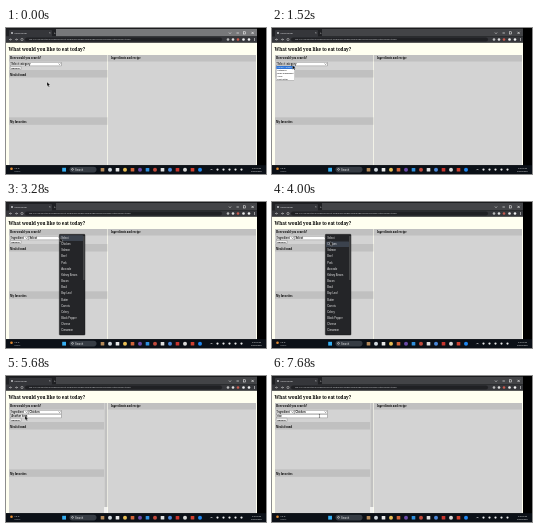
Animation of 260x146 px, one loop 8 s. Source, as an HTML page:

```html
<!DOCTYPE html>
<html lang="en">
<head>
<meta charset="utf-8">
<title>Meal finder</title>
<style>
html, body { margin: 0; width: 100%; height: 100%; overflow: hidden; background: #000; }
svg { display: block; width: 100%; height: 100%; }
text { white-space: pre; }
.serif { font-family: "Noto Serif", serif; }
.sans { font-family: "Liberation Sans", sans-serif; }
</style>
</head>
<body>
<svg id="stage" viewBox="0 0 260 146" preserveAspectRatio="none"></svg>
<script>
const LOOP = 8000, STEP = 80;
const PAGE = '#fffff0', BODY = '#d3d3d3', HEAD = '#c0c0c0';
const stage = document.getElementById('stage');

const rect = (x, y, w, h, fill, extra = '') =>
  `<rect x="${x}" y="${y}" width="${w}" height="${h}" fill="${fill}" ${extra}/>`;
const dot = (x, y, r, fill) => `<circle cx="${x}" cy="${y}" r="${r}" fill="${fill}"/>`;
const line = (d, color, width = 0.5) =>
  `<path d="${d}" fill="none" stroke="${color}" stroke-width="${width}"/>`;
const text = (x, y, size, fill, str, cls = 'sans', weight = 400) =>
  `<text class="${cls}" x="${x}" y="${y}" font-size="${size}" font-weight="${weight}" fill="${fill}">${str}</text>`;
const title = (x, y, str) => text(x, y, 2.6, '#000', str, 'serif', 900);

const field = (x, y, w, label) =>
  rect(x, y, w, 3.7, '#fff', 'stroke="#767676" stroke-width=".4"') +
  text(x + 1, y + 2.8, 2.6, '#000', label, 'sans', 700);

const select = (x, y, w, label) => field(x, y, w, label) +
  line(`M${x + w - 2.4} ${y + 1.4}l.8 .8l.8-.8`, '#000', 0.5);

const button = y =>
  rect(4.2, y, 11, 3.1, '#efefef', 'stroke="#767676" stroke-width=".4" rx=".4"') +
  text(5.2, y + 2.4, 2.5, '#000', 'Search', 'sans', 700);

// The title bar darkens once the window has focus.
function titleBar(t) {
  return rect(0, 0, 251, 8.5, t < 1520 ? '#77787a' : '#434447') + rect(0, 0, 251, 1, '#1b1c1e') +
    rect(0, 1, 50, 7.5, '#202124') + rect(3, 2, 43, 7, '#35363a', 'rx="1"') +
    dot(6, 5, 1, '#c4c6c8') + text(8.5, 5.9, 2.5, '#e2e3e5', 'Meal finder') +
    text(43, 5.9, 2.8, '#ddd', '×') + text(48, 6.2, 3, '#ccc', '+') +
    line('M223 4.6l1 1l1-1M230.5 5h2.4M245.5 3.8l2.2 2.2m0-2.2l-2.2 2.2', '#fff', 0.6) +
    rect(237.5, 3.8, 2.2, 2.2, 'none', 'stroke="#fff" stroke-width=".5"');
}

function toolbar() {
  let s = rect(0, 8.5, 251, 6, '#35363a') + rect(19, 9.4, 197, 4.2, '#202124', 'rx="2"');
  s += line('M6 11.5H3.5l1-1m-1 1l1 1M9 11.5h2.5l-1-1m1 1l-1 1', '#ddd') +
    '<circle cx="16" cy="11.5" r="1.1" fill="none" stroke="#ddd" stroke-width=".5"/>';
  s += text(23, 12.4, 2.5, '#c6c8cb', 'file:///C:/projects/coursework/front-end/meal-finder/app/pages/search/index.html?view=today');
  [[222, '#bbb'], [227, '#ddd'], [232, '#c85a4e'], [237.5, '#eee'], [243, '#f2f2f2']]
    .forEach(([x, c]) => s += dot(x, 11.5, 1.3, c));
  return s + line('M248.5 10v3', '#ddd', 0.6);
}

function taskbar() {
  const colors = ['#b58a5a', '#cfd6dd', '#e8e8e8', '#e8bd55', '#d0643a', '#6a4aa8', '#2f8fdc',
    '#c14a3c', '#e0e0e0', '#4a86d8', '#c8352e', '#d8d8d8', '#d0402f', '#1f86f0'];
  let s = rect(0, 137.2, 260, 8.8, '#0b1017');
  s += dot(5.5, 140.8, 1.3, '#e28b32') + text(8.3, 141, 2.4, '#f2f2f2', '72°F') +
    text(8.3, 143.8, 2.2, '#b4b8bd', 'Sunny');
  s += rect(56.2, 139.8, 3.8, 3.8, '#35aef2') + rect(63.5, 138.8, 27, 5.6, '#363c44', 'rx="2.8"') +
    '<circle cx="66.5" cy="141.4" r=".9" fill="none" stroke="#fff" stroke-width=".5"/>' +
    text(69, 142.5, 2.6, '#e6e8ea', 'Search');
  colors.forEach((c, i) => s += i % 2 ? dot(96.5 + i * 7.5, 141.7, 2, c)
    : rect(94.7 + i * 7.5, 139.9, 3.6, 3.6, c, 'rx=".5"'));
  s += line('M204.5 142.1l1-1l1 1', '#fff', 0.6);
  for (let i = 0; i < 5; i++) s += dot(211.5 + i * 6, 141.6, 1.1, '#e8e8e8');
  return s + text(246, 141, 2.4, '#f4f4f4', '2:34 PM') + text(245, 143.9, 2.4, '#f4f4f4', '4/18/2023');
}

// The left column gains a text field, which makes it overflow and scroll.
function page(t) {
  const grown = t >= 5520, dy = grown ? 4 : 0, w = grown ? 95.3 : 98.3;
  let s = rect(0, 14.5, 251, 122.8, PAGE) +
    text(2.5, 22.7, 4.48, '#000', 'What would you like to eat today?', 'serif', 700);
  s += rect(3, 27, w, 110, BODY) + rect(102, 27, 148, 110, BODY) +
    rect(102, 27, 148, 6.5, HEAD) + title(105, 31.4, 'Ingredients and recipe');
  [[27, 6.5, 'How would you search?'], [42 + dy, 7.5, 'Meals found'], [89.3 + dy, 7.5, 'My favorites']]
    .forEach(([y, h, label]) => s += rect(3, y, w, h, HEAD) + title(4, y + (h < 7 ? 4.4 : 5.8), label));
  if (grown) s += rect(98.3, 27, 3, 110, '#f1f1f1') + rect(98.3, 27, 3, 104, '#c1c1c1');

  if (t < 2160) s += select(4.2, 34.2, 51, 'Select category');
  else s += select(4.2, 34.2, 17.8, 'Ingredient') +
    select(22.4, 34.2, 32.8, t < 4480 ? 'Select' : 'Chicken');
  if (grown) {
    const typed = 'rice'.slice(0, Math.max(0, Math.floor((t - 7120) / 120)));
    s += field(4.2, 38.2, 51, typed || (t < 6880 ? 'Another item' : ''));
  }
  return s + button(grown ? 42.2 : 38.4);
}

function typeMenu(t, y) {
  if (t < 1520 || t >= 2160) return '';
  const items = ['Select category', 'Category', 'Main ingredient', 'Area', 'First letter'];
  const hot = Math.max(0, Math.min(4, Math.floor((y - 36.2) / 2.8)));
  let s = rect(4.2, 38, 18.6, 14.2, '#fff', 'stroke="#777" stroke-width=".3"');
  items.forEach((label, i) => {
    if (i === hot) s += rect(4.4, 38.1 + i * 2.8, 18.2, 2.8, '#1967d2');
    s += text(5.2, 40.3 + i * 2.8, 2.4, i === hot ? '#fff' : '#000', label);
  });
  return s;
}

function foodMenu(t, y) {
  if (t < 3280 || t >= 4480) return '';
  const items = ['Select', 'Chicken', 'Salmon', 'Beef', 'Pork', 'Avocado', 'Kidney Beans', 'Bacon',
    'Basil', 'Bay Leaf', 'Butter', 'Carrots', 'Celery', 'Black Pepper', 'Cheese', 'Cinnamon'];
  const hot = y < 38.8 ? 0 : 1;
  let s = rect(53.3, 32.3, 25.7, 100.7, '#242528', 'rx=".7" stroke="#111" stroke-width=".4"');
  items.forEach((label, i) => {
    if (i === hot) s += rect(54, 33.3 + i * 6.15, 23, 5.6, '#3b424d', 'rx=".5"');
    s += text(55.2, 37 + i * 6.15, 2.6, '#eee', label);
  });
  return s + rect(77.6, 34, 0.7, 44, '#777', 'rx=".3"');
}

const path = [
  [0, 41, 54], [80, 41, 54], [560, 21, 37.4], [1040, 21, 37.4], [1120, 21.3, 37.2],
  [1520, 20.5, 37.2], [2080, 18, 44.5], [2240, 18, 44.5], [2640, 43, 38.8], [3040, 54, 35.8],
  [3600, 54, 35.8], [4000, 58, 39.5], [4320, 57, 40.2], [4400, 57, 40.2], [4640, 56, 36.3],
  [5120, 56, 36.3], [5520, 19, 39.8], [5840, 19, 39.8], [6080, 19, 43], [6160, 19, 43],
  [6880, 47.5, 38.4], [8000, 47.5, 38.4]
];

function pointer(t) {
  const i = path.findIndex(p => p[0] > t), [t0, x0, y0] = path[i - 1], [t1, x1, y1] = path[i];
  const k = (t - t0) / (t1 - t0), e = k * k * (3 - 2 * k);
  return [x0 + (x1 - x0) * e, y0 + (y1 - y0) * e];
}

const arrow = (x, y) =>
  `<path transform="translate(${x} ${y})" d="M0 0V4.2L1 3.3L1.7 4.9L2.5 4.5L1.8 3H3.1Z" fill="#080808" stroke="#eee" stroke-width=".25"/>`;
const caret = (x, y) => line(`M${x - 0.6} ${y}h1.2m-.6 0v3m-.6 0h1.2`, '#222', 0.4);

stage.innerHTML = rect(0, 0, 260, 146, '#000') + '<g id="live"></g>' + toolbar() + taskbar() + '<g id="top"></g>';
const live = document.getElementById('live'), over = document.getElementById('top');

function draw(ms) {
  const t = Math.floor(ms % LOOP / STEP) * STEP;
  const [x, y] = pointer(t);
  live.innerHTML = titleBar(t) + page(t);
  over.innerHTML = typeMenu(t, y) + foodMenu(t, y) + (t < 6880 ? arrow : caret)(x, y);
}

const start = performance.now();
function tick() {
  draw(performance.now() - start);
  requestAnimationFrame(tick);
}
tick();
</script>
</body>
</html>
```
